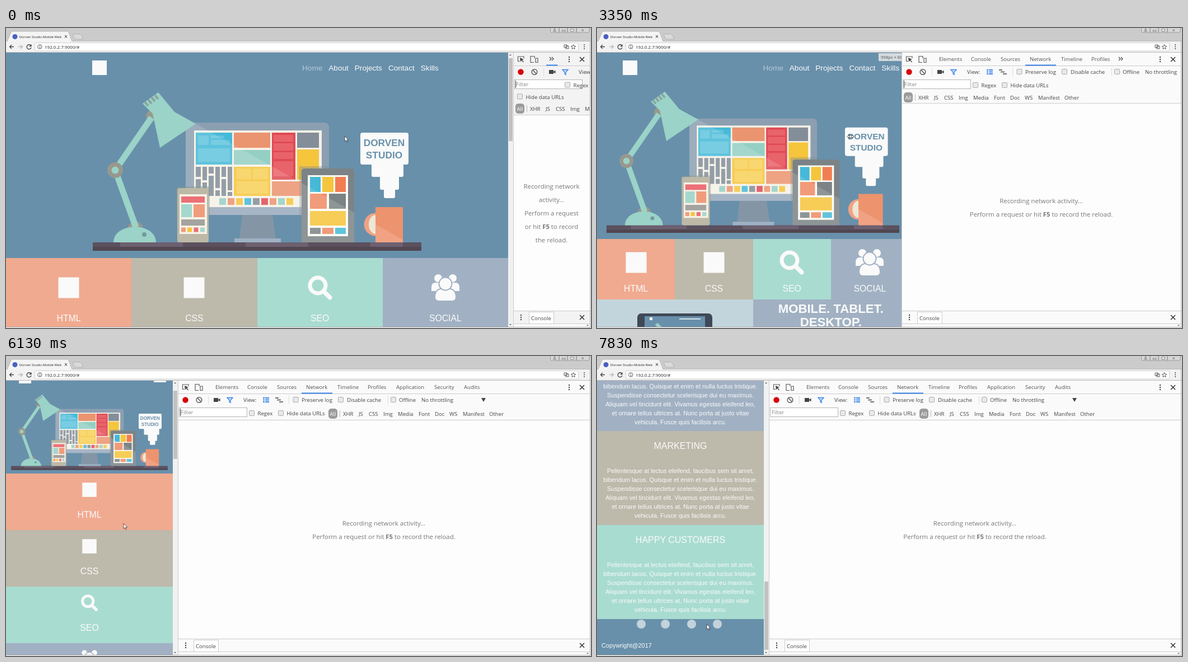
These frames come from a looping animation (1045 px wide and 536 px high, 7.99 s). An HTML page:

```html
<!DOCTYPE html>
<html lang="en">
<head>
<meta charset="utf-8">
<title>Responsive page demo</title>
<style>
html, body { margin: 0; width: 100%; height: 100%; overflow: hidden; background: #fff; }
#stage { position: relative; width: 1045px; height: 536px; overflow: hidden; font-family: "Liberation Sans", Arial, sans-serif; }
#ui { position: absolute; left: 0; top: 0; font-family: "Open Sans", "Noto Sans", sans-serif; }
#page { position: absolute; left: 0; top: 44px; height: 490px; overflow: hidden; background: #6890ab; }
#doc { container-type: inline-size; position: absolute; left: 0; top: 0; right: 9px; height: 1900px; color: #fafafa; }
.hero { position: relative; padding-top: 59px; background: #6890ab; --m: max(17px, (100cqw - 648px) / 2); }
.hero > svg { display: block; width: min(625px, 100%); aspect-ratio: 625 / 308; margin: auto; }
.logo { position: absolute; left: calc(var(--m) + 29px); top: 14px; width: 26px; height: 26px; background: #fafafa; }
nav { position: absolute; right: var(--m); top: 18px; display: flex; gap: 11px; font-size: 13.6px; line-height: 20px; }
nav .on { color: #b4cad6; }
.bars { display: none; position: absolute; right: 12px; top: 16px; width: 22px; height: 4px; background: #fafafa; box-shadow: 0 7px #fafafa, 0 14px #fafafa; }
.tiles { display: grid; grid-template-columns: repeat(4, 1fr); }
.tile { position: relative; height: calc(63.4px + 8cqw); text-align: center; }
.tile svg, .tile i { position: absolute; left: 50%; top: calc(23.9px + 3.25cqw); width: 50px; height: 50px; translate: -50% -50%; }
.tile i { width: 37px; height: 37px; background: #fafafa; }
.tile b { position: absolute; left: 0; right: 0; top: calc(46.3px + 5.77cqw); font: 15.8px/20px "Liberation Sans", Arial, sans-serif; }
.salmon { background: #f0aa90; } .sand { background: #bdb9ab; } .mint { background: #a9dcd0; } .slate { background: #a1b1c3; }
.pair { display: grid; grid-template-columns: 1fr 1fr; text-align: center; }
.device { height: 240px; background: #c3d5dc; }
.device svg { display: block; margin: 25px auto 0; }
.copy h2 { margin: 5px 0 0; font-size: 22.2px; line-height: 24px; }
p { margin: 0; font-size: 10.9px; line-height: 16px; white-space: nowrap; }
.copy p { margin-top: 20px; }
.services { display: grid; grid-template-columns: repeat(4, 1fr); text-align: center; overflow: hidden; }
.services div { height: 167.75px; overflow: hidden; }
h3 { margin: 17px 0 26px; font-size: 16px; font-weight: 400; line-height: 20px; }
footer { position: relative; height: 64px; background: #6890ab; font-size: 10.9px; }
footer i { position: absolute; top: 1px; width: 16px; height: 16px; border-radius: 50%; background: #c3d3dc; }
footer span { position: absolute; left: 8px; top: 37px; line-height: 20px; }
@container (max-width: 430px) {
  .hero { padding-top: 50px; }
  .logo { left: 23px; width: 22px; height: 22px; }
  .bars { display: block; }
  nav { display: none; }
  nav.open { display: block; right: 12px; top: 35px; width: 160px; height: 147px; padding: 11px 0 0 11px; border: 1px solid #dfe8ee; background: #6890ab; line-height: 27.3px; text-align: center; }
  nav.open a { display: block; }
  .tiles, .pair, .services { grid-template-columns: 1fr; }
  .tile { height: 101px; }
  .tile svg, .tile i { top: 29px; scale: .69; }
  .tile b { top: 64px; }
  .device { height: 200px; }
  .copy { height: 356px; }
}
#track { position: absolute; top: 0; right: 0; width: 9px; height: 490px; background: #f1f1f1; }
#thumb { position: absolute; left: 1px; width: 7px; background: #c1c1c1; }
#track::before, #track::after { content: ""; position: absolute; left: 2px; border: 2.5px solid transparent; }
#track::before { top: 1px; border-bottom-color: #555; }
#track::after { bottom: 1px; border-top-color: #555; }
#badge { position: absolute; right: 0; top: 1px; width: 59px; padding-left: 4px; background: #d4dade; color: #555; font: 7.6px/14px "Open Sans", sans-serif; white-space: nowrap; }
</style>
</head>
<body>
<div id="stage">
  <div id="page">
    <div id="doc">
      <div class="hero">
        <svg viewBox="135 103 625 308"><use href="#scene"/></svg>
        <div class="logo"></div><div class="bars"></div>
        <nav><a>Home</a><a>About</a><a>Projects</a><a>Contact</a><a>Skills</a></nav>
      </div>
      <div class="tiles">
        <div class="tile salmon"><i></i><b>HTML</b></div>
        <div class="tile sand"><i></i><b>CSS</b></div>
        <div class="tile mint"><svg viewBox="-25 -25 50 50" fill="none" stroke="#fafafa"><circle cx="-4" cy="-4" r="14" stroke-width="7"/><path d="M8 8 17.500 17.500" stroke-width="8" stroke-linecap="round"/></svg><b>SEO</b></div>
        <div class="tile slate"><svg viewBox="-25 -25 50 50" fill="#fafafa"><circle cx="-13" cy="-17" r="7"/><circle cx="13" cy="-17" r="7"/><path d="M-25 6V-2Q-24-9-18-9H18Q24-9 25-2V6Z"/><g stroke="#a1b1c3" stroke-width="2"><path d="M-19 18Q-19 3-8 2H8Q19 3 19 18 18 24 12 24H-12Q-18 24-19 18Z"/><circle cy="-7" r="11.500"/></g></svg><b>SOCIAL</b></div>
      </div>
      <div class="pair">
        <div class="device" style="overflow:hidden"><svg width="134" height="170"><rect width="134" height="170" rx="7" fill="#3f4857"/><path fill="#6890ab" d="M13 5h108v150H13z"/><path fill="#fafafa" d="M22 7h5v5h-5zM75 9h38v1.500H75z"/><svg x="13" y="14" width="108" height="54" viewBox="135 103 625 308"><use href="#scene"/></svg><path fill="#f0aa90" d="M13 68h27v24H13z"/><path fill="#bdb9ab" d="M40 68h27v24H40z"/><path fill="#a9dcd0" d="M67 68h27v24H67z"/><path fill="#a1b1c3" d="M94 68h27v24H94z"/><path fill="#c3d5dc" d="M13 92h108v63H13z"/></svg></div>
        <div class="copy slate"><h2>MOBILE. TABLET.<br>DESKTOP.</h2><p class="lorem"></p></div>
      </div>
      <div class="services">
        <div class="salmon"><h3>WEB DESIGN</h3><p class="lorem"></p></div>
        <div class="slate"><h3>GLOBAL SEARCH</h3><p class="lorem"></p></div>
        <div class="sand"><h3>MARKETING</h3><p class="lorem"></p></div>
        <div class="mint"><h3>HAPPY CUSTOMERS</h3><p class="lorem"></p></div>
      </div>
      <footer><i style="left:71px"></i><i style="left:114px"></i><i style="left:161px"></i><i style="left:207px"></i><span>Copywright@2017</span></footer>
    </div>
    <div id="track"><div id="thumb"></div></div>
    <div id="badge"></div>
  </div>

  <svg id="ui" width="1045" height="536" viewBox="0 0 1045 536">
    <defs>
      <clipPath id="lit"><path d="M320 169h256v82h45v132h-94v-49H320zM659 320h49v63h-49z"/></clipPath>
      <g id="scene">
        <path fill="#5c505e" d="M154 383h587v8H154z"/><path fill="#6d6070" d="M203 383h112v8H203zM427 383h112v8H427zM650 383h58v8h-58z"/><path fill="#51464f" d="M154 391h587v7H154z"/>
        <path fill="#8496a6" d="M421 334h54l6 43h-65z"/><path fill="#9fb1c4" d="M407 376h83v7h-83z"/>
        <rect x="320" y="169" width="256" height="165" rx="8" fill="#8c9fb1"/><path fill="#98aabd" d="M320 320h256v6q0 8-8 8H328q-8 0-8-8z"/>
        <path fill="#f4f1e6" d="M335 183h228v137H335z"/>
        <path fill="#45b9d7" d="M338 187h65v57h-65z"/><path fill="#62c5dd" d="M342 192h19v17h-19zM365 192h24v5h-24zM365 200h34v9h-34zM342 215h57v24h-57z"/>
        <path fill="#eb9470" d="M406 187h65v27h-65zM474 274h84v26h-84z"/><path fill="#95cfc3" d="M406 218h65v26h-65z"/>
        <path fill="#e04a55" d="M474 187h42v84h-42z"/><path fill="#e9636b" d="M477 191h35v12h-35zM477 206h35v13h-35zM477 222h35v12h-35zM477 238h35v27h-35z"/>
        <path fill="#848e99" d="M519 187h39v27h-39zM338 248h9v18h-9zM338 270h9v30h-9zM350 248h8v24h-8zM350 276h8v24h-8zM361 248h9v12h-9zM361 264h9v36h-9zM373 248h8v38h-8zM373 290h8v10h-8zM384 248h8v18h-8zM384 270h8v30h-8zM395 248h8v42h-8zM395 293h8v7h-8z"/>
        <path fill="#f5c53c" d="M519 217h39v54h-39zM406 248h65v52h-65z"/><path fill="#f8d058" d="M411 251h26v19h-26zM440 251h27v19h-27zM411 274h56v22h-56z"/>
        <path fill="#95cfc3" d="M380 304h12v12h-12zM485 304h12v12h-12z"/><path fill="#eb9470" d="M395 304h12v12h-12zM470 304h12v12h-12z"/><path fill="#f5c53c" d="M410 304h12v12h-12zM500 304h12v12h-12z"/><path fill="#45b9d7" d="M425 304h12v12h-12z"/><path fill="#848e99" d="M440 304h12v12h-12z"/><path fill="#e04a55" d="M455 304h12v12h-12z"/>
        <path fill="#7d8a91" opacity=".4" d="M523 247h53v87h-53z"/>
        <rect x="527" y="251" width="94" height="132" rx="5" fill="#7b8386"/><path fill="#fdfbf4" d="M538 263h72v109h-72z"/>
        <path fill="#45b9d7" d="M542 266h19v27h-19zM587 357h19v11h-19z"/><path fill="#f5c53c" d="M564 266h20v27h-20zM542 327h64v26h-64z"/><path fill="#f27d53" d="M587 266h19v27h-19z"/><path fill="#ef8a64" d="M542 296h30v27h-30zM564 357h20v11h-20z"/><path fill="#7b8386" d="M576 296h30v27h-30zM542 357h19v11h-19z"/>
        <circle cx="659" cy="351" r="20.500" fill="#f0a284"/><path fill="#ede7d6" d="M659 334a12 17 0 0 0 0 34z"/><path fill="#ed936e" d="M659 320h49v63h-49z"/>
        <path fill="#fff" opacity=".14" clip-path="url(#lit)" d="M338 171 717 383H320V171z"/>
        <path fill="#829895" opacity=".45" d="M303 283h60v51h-60z"/><rect x="305" y="286" width="56" height="97" rx="4" fill="#bdb9a6"/><path fill="#f5f2e8" d="M309 297h49v71h-49z"/>
        <path fill="#ec7077" d="M312 301h42v11h-42zM334.500 356.500h8v8h-8z"/><path fill="#a5d8cd" d="M312 315h19v23h-19zM346 356.500h8v8h-8z"/><path fill="#f09c7c" d="M334 315h20v23h-20zM312 356.500h8v8h-8z"/><path fill="#a5a39f" d="M312 342h42v11h-42z"/><path fill="#f5c53c" d="M323 356.500h8v8h-8z"/>
        <circle cx="230" cy="359" r="13.500" fill="#98988d"/><circle cx="259" cy="157" r="10" fill="#98988d"/>
        <path fill="none" stroke="#9bd3c8" stroke-width="11" d="M231 356 194 254 259 160"/><circle cx="194" cy="254" r="14" fill="#98988d"/><circle cx="194" cy="254" r="6.500" fill="#9bd3c8"/>
        <path fill="#9bd3c8" d="M191 383C192 346 266 346 267 383zM243 135 271 115 300 150 338 171 274 214 261 153z"/><circle cx="246" cy="369" r="4" fill="#75999f"/>
        <path stroke="#8aa39d" stroke-width="4" d="m247 132 6 7m0-11 6 7m0-11 6 7m0-11 6 7"/>
        <g fill="#fafafa"><rect x="632" y="187" width="86" height="57" rx="4"/><rect x="652" y="240" width="57" height="26" rx="3"/><rect x="667" y="262" width="34" height="27" rx="3"/><rect x="674" y="285" width="20" height="19" rx="3"/></g>
        <g fill="#6890ab" font-family="Liberation Sans, Arial, sans-serif" font-weight="700" font-size="17.300" text-anchor="middle"><text x="674.500" y="211">DORVEN</text><text x="674.500" y="233">STUDIO</text></g>
      </g>
    </defs>

    <svg id="panel" y="44" height="490">
      <rect width="1045" height="490" fill="#fdfdfd"/>
      <rect id="head" width="1045" height="111"/><rect id="foot" y="461" width="1045" height="23"/>
      <path stroke="#ccc" d="M.5 0V490M0 23.500H1045M0 461.500H1045M0 484.500H1045"/><path id="headLine" stroke="#ccc" d="M0 0H1045"/>
      <path stroke="#ddd" d="M54.500 27v15M198.500 27v15M375.500 27v15"/>
      <g fill="none" stroke="#5a5a5a" stroke-width="1.200"><path d="M12 15.500H8.500V7H19V10"/><path d="M31 10V6.500h7V10M40 10h4v7.500h-4zM31 9v8.500h6"/><circle cx="38" cy="34.500" r="4.800" stroke-width="1.500"/><path stroke-width="1.500" d="m35 31 6.500 7"/></g>
      <path fill="#444" d="m12 9 7 3-3 1 3 3.500-1 1-3-3.500-2 2.500z"/>
      <circle cx="13.500" cy="34.500" r="5.200" fill="#d9000d"/>
      <path fill="#444" d="M64 31h8v7h-8zM72 34l3.500-2.500v6L72 35z"/><path fill="#cfe0fb" stroke="#3b82e8" stroke-width="1.300" d="M88 30.500h10l-4 4.500v4.500l-2-1.500v-3z"/>
      <path stroke="#3b82e8" stroke-width="2" d="M152 31h3m1 0h7M152 34.500h3m1 0h7M152 38h3m1 0h7"/><path stroke="#444" stroke-width="1.500" d="M174 31h6m-3 3.500h7m-3 3.500h7"/>
      <g id="labels" fill="#444" font-size="9.600"></g>
      <g id="tabs" fill="#555" font-size="9.600"></g>
      <g id="more"><path fill="none" stroke="#444" stroke-width="1.200" d="m-4 8 3 3-3 3m4-6 3 3-3 3"/></g>
      <path id="active" fill="#3b82e8" d="M0 21.500h55v2H0z"/>
      <rect x="2.500" y="48.500" width="121" height="16" fill="#fff" stroke="#b5b5b5"/><text x="5" y="60" font-size="9.600" fill="#888">Filter</text><path id="caret" stroke="#333" d="M4.500 50v13"/>
      <g id="regex"></g><g id="hide"></g><g id="types" font-size="9.600" fill="#444"></g>
      <g id="message" fill="#777" font-size="11.400" text-anchor="middle"></g>
      <g fill="#444"><circle cx="14" cy="469" r="1.200"/><circle cx="14" cy="473" r="1.200"/><circle cx="14" cy="477" r="1.200"/></g>
      <path fill="#fff" stroke="#ccc" d="M28.500 463.500h44v21h-44z"/><text x="32" y="477.500" font-size="9.600" fill="#444">Console</text>
    </svg>
    <g fill="#444"><circle cx="1006" cy="52" r="1.200"/><circle cx="1006" cy="56" r="1.200"/><circle cx="1006" cy="60" r="1.200"/></g>
    <path stroke="#333" stroke-width="1.500" d="m1025 52 8 8m0-8-8 8M1025 513l8 8m0-8-8 8"/><path fill="#555" d="m1037 532 2-2 2 2z"/>

    <path fill="#cbcbcb" d="M0 0h1045v24H0z"/><path fill="#f2f2f2" d="M0 24h1045v19.500H0z"/><path stroke="#b8b8b8" d="M0 23.500H1045M0 43.500H1045"/>
    <path fill="#f4f4f4" stroke="#aaa" stroke-width=".7" d="M2 24 9 8q1-2 3-2h97q2 0 3 2l6 16"/><path fill="#f3f3f3" d="M3 23h114v2H3z"/><path fill="#dadada" stroke="#aaa" stroke-width=".7" d="M119 11h13q1 0 2 1l4 8h-13q-2 0-3-2z"/>
    <circle cx="16" cy="15.500" r="4.500" fill="#4a5fc0"/><text x="24" y="17.500" font-size="6" fill="#222">Dorven Studio-Mobile Web</text><path stroke="#333" d="m105 13 4 4.500m0-4.500-4 4.500"/>
    <g fill="#d6d6d6" stroke="#8f8f8f" stroke-width=".8"><path d="M972.500-1h15.500v9h-13q-2.500 0-2.500-2zM988-1h15v9h-15zM1003-1h16v9h-16zM1019-1h23v7q0 2-2 2h-21z"/><path fill="#fff" stroke="#666" d="M993 4h6v2h-6zM1009 2h5v4h-5zM977.500 6q2.500-4 5 0z"/><circle cx="980" cy="2.500" r="1.300" stroke="#666"/><path stroke="#666" d="m1028 2 4 4m0-4-4 4"/></g>
    <rect x="51.500" y="26.500" width="971" height="14.500" rx="2" fill="#fff" stroke="#d0d0d0"/>
    <g fill="none" stroke="#444" stroke-width="1.300"><path d="M14 33.500H6.500M10 30l-3.500 3.500L10 37"/><path stroke="#bbb" d="M22 33.500h7.500M26 30l3.500 3.500L26 37"/><path d="M44.500 31.500A4 4 0 1 0 45 35M45 29.500v3h-3"/><path stroke-width=".9" d="M60.500 33v3M60.500 31v1M64 33.500a3.700 3.700 0 1 1-7.400 0 3.700 3.700 0 0 1 7.400 0zM997 30h5v5h-5zM1000 32h5v5h-5zM1013.500 29.500l1.200 2.800 3 .2-2.300 2 .7 3-2.600-1.600-2.600 1.600.7-3-2.300-2 3-.2z"/></g>
    <g fill="#444"><circle cx="1033" cy="30" r="1"/><circle cx="1033" cy="33.500" r="1"/><circle cx="1033" cy="37" r="1"/></g>
    <text x="69" y="36.700" font-size="8" fill="#222">192.0.2.7:9000/#</text>
    <path stroke="#a9a9a9" d="M1043.500 24V536M0 534.500H1045"/><path fill="#f4f4f4" d="M1044 44h1v492h-1z"/>

    <g id="cursor" stroke="#222" stroke-width=".7" fill="#fff">
      <path id="arrow" d="M0 0V9.500L2.200 7.600 3.700 11 5.200 10.400 3.700 7H6.600Z"/>
      <path id="resize" d="M-6 0-3-3V-1H-1V-3H1V-1H3V-3L6 0 3 3V1H1V3H-1V1H-3V3Z"/>
      <path id="hand" d="M-1 0Q0-1 1 0V4L5 5Q6 5 6 7L5 11H0L-3 7Q-3 5-1 6.500Z"/>
    </g>
  </svg>
</div>
<script>
const LOOP = 7990, RIGHT = 1043;
const $ = id => document.getElementById(id);
const text = (x, y, s) => `<text x="${x}" y="${y}">${s}</text>`;
const box = (x, y) => `<rect x="${x - 4.5}" y="${y - 4.5}" width="9" height="9" rx="1" fill="#e9e9e9" stroke="#aaa"/>`;
const move = (id, x, y) => $(id).setAttribute('transform', `translate(${x} ${y})`);
const show = (el, on) => { el.style.display = on ? '' : 'none'; };

const lorem = ['Pellentesque at lectus eleifend, faucibus sem sit amet,', 'bibendum lacus. Quisque et enim et nulla luctus tristique.',
  'Suspendisse consectetur scelerisque dui eu maximus.', 'Aliquam vel tincidunt elit. Vivamus egestas eleifend leo,',
  'et ornare tellus ultrices at. Nunc porta at justo vitae', 'vehicula. Fusce quis facilisis arcu.'].join('<br>');
document.querySelectorAll('.lorem').forEach(p => { p.innerHTML = lorem; });

const tabs = [['Elements', 67], ['Console', 124], ['Sources', 177], ['Network', 229], ['Timeline', 285],
  ['Profiles', 339], ['Application', 390], ['Security', 458], ['Audits', 511]];
const tabEnd = i => i < tabs.length - 1 ? tabs[i + 1][1] - 16 : 540;
const types = [['XHR', 30], ['JS', 58], ['CSS', 76], ['Img', 102], ['Media', 128], ['Font', 165], ['Doc', 194], ['WS', 220], ['Manifest', 244], ['Other', 291]];
$('tabs').innerHTML = tabs.map(([s, x]) => text(x, 15.3, s)).join('');
$('labels').innerHTML = text(117, 38, 'View:') + box(210.5, 34) + text(221, 38, 'Preserve log') + box(291, 34) + text(302, 38, 'Disable cache')
  + box(385, 34) + text(395, 38, 'Offline') + text(435, 38, 'No throttling') + '<path d="M542 31h8l-4 7z"/>';
const option = s => box(0, 0) + `<text x="10.500" y="4" font-size="9.600" fill="#444">${s}</text>`;
$('regex').innerHTML = option('Regex');
$('hide').innerHTML = option('Hide data URLs');
$('types').innerHTML = '<rect x="4" y="-9" width="16" height="18" rx="5" fill="#9b9b9b"/><text x="12" y="3.500" fill="#fff" text-anchor="middle">All</text><path stroke="#bbb" d="M24.500-6V6"/>'
  + types.map(([s, x]) => text(x, 3.8, s)).join('');
const key = '<tspan font-weight="700">F5</tspan>';
const lines = rows => '<g>' + rows.map((s, i) => text(0, (i - (rows.length - 1) / 2) * 24 + 4, s)).join('') + '</g>';
$('message').innerHTML = lines(['Recording network', 'activity...', 'Perform a request', `or hit ${key} to record`, 'the reload.'])
  + lines(['Recording network activity...', `Perform a request or hit ${key} to record the reload.`]);

// Held values: [start ms, value]
const edge = [[0, 906], [2870, 902], [2990, 857], [3110, 755], [3230, 650], [3350, 544], [3500, 420], [3620, 335], [3770, 307]];
const pageEdge = [[0, 906], [2990, 902], [3110, 857], [3230, 700], [3350, 566], [3500, 544], [3620, 420], [3770, 335], [3890, 307]];
const scroll = [[0, 0], [6130, 31], [6250, 190], [6370, 470], [6490, 800], [6650, 1120], [6820, 1355], [6940, 1402]];
const hover = [[0, 0], [760, 1], [900, 2], [1090, 3], [1360, 4], [1600, 0]];
const pointer = [[0, 'arrow'], [640, 'hand'], [1600, 'arrow'], [2080, 'resize'], [3890, 'arrow'], [4450, 'hand'], [5410, 'arrow']];
// Moving values: [ms, x, y]
const path = [[0, 605, 193], [130, 605, 193], [400, 560, 120], [560, 522, 78], [760, 580, 72], [1090, 686, 70], [1400, 752, 66], [1650, 800, 90],
  [2200, 905, 217], [2690, 906, 218], [2750, 896, 218], [2870, 857, 218], [3350, 453, 194], [3620, 325, 188], [3770, 307, 187], [3890, 307, 187],
  [4450, 283, 68], [5290, 283, 66], [5410, 281, 80], [6010, 210, 299], [7250, 210, 299], [7830, 196, 479], [LOOP, 196, 479]];

const held = (track, t) => track.findLast(k => k[0] <= t)[1];
function along(track, t) {
  const i = Math.max(1, track.findIndex(k => k[0] > t));
  const a = track[i - 1], b = track[i], u = (t - a[0]) / (b[0] - a[0]);
  return [a[1] + (b[1] - a[1]) * u, a[2] + (b[2] - a[2]) * u];
}

function drawPanel(x, t) {
  const w = RIGHT - x, narrow = w < 260, wide = w > 600;
  const headBottom = narrow ? 111 : wide ? 70 : 90, tint = narrow ? '#f3f3f3' : '#fafafa';
  $('panel').setAttribute('x', x);
  $('panel').setAttribute('width', w);
  $('head').setAttribute('height', headBottom);
  $('head').setAttribute('fill', tint);
  $('foot').setAttribute('fill', tint);
  move('headLine', 0, headBottom + .5);
  let shown = tabs.findIndex((_, i) => tabEnd(i) + 20 > w - 44);
  if (shown < 0) shown = tabs.length;
  [...$('tabs').children].forEach((el, i) => show(el, i < shown));
  show($('more'), shown < tabs.length);
  if (shown < tabs.length) move('more', tabs[shown][1] + 2, 0);
  const active = shown > 3;
  $('active').setAttribute('transform', active ? 'translate(221 0)' : `translate(${tabs[shown][1] - 8} 0) scale(.37 1)`);
  move('regex', narrow ? 1003 - x : 132, narrow ? 57.5 : 58);
  move('hide', narrow ? 12 : 184, narrow ? 78.5 : 58);
  move('types', wide ? 265 : 0, narrow ? 100 : wide ? 59 : 80);
  move('message', w / 2, (headBottom + 461) / 2 + 1);
  const [tall, short] = $('message').children;
  show(tall, narrow);
  show(short, !narrow);
  show($('caret'), t % 1000 < 500 || (t > 2750 && t < 3770));
}

function drawPage(width, t) {
  const top = held(scroll, t), mobile = width - 9 <= 430, ratio = 471 / (mobile ? 1892 : 1559);
  $('page').style.width = width + 'px';
  $('doc').style.top = -top + 'px';
  $('thumb').style.top = 10 + top * ratio + 'px';
  $('thumb').style.height = 490 * ratio + 'px';
  const dragging = t >= 2990 && t < 4330;
  show($('badge'), dragging);
  show($('track'), !(t >= 3110 && t < 3770));
  $('badge').textContent = `${Math.round(width / .567)}px × 864px`;
  const nav = document.querySelector('nav'), over = held(hover, t);
  nav.classList.toggle('open', t >= 4690 && t < 5290);
  [...nav.children].forEach((a, i) => a.classList.toggle('on', i === 0 || i === over));
}

function frame(now) {
  const t = now % LOOP;
  drawPage(held(pageEdge, t), t);
  drawPanel(held(edge, t), t);
  move('cursor', ...along(path, t));
  for (const el of $('cursor').children) show(el, el.id === held(pointer, t));
  requestAnimationFrame(frame);
}
frame(performance.now());
</script>
</body>
</html>
```
